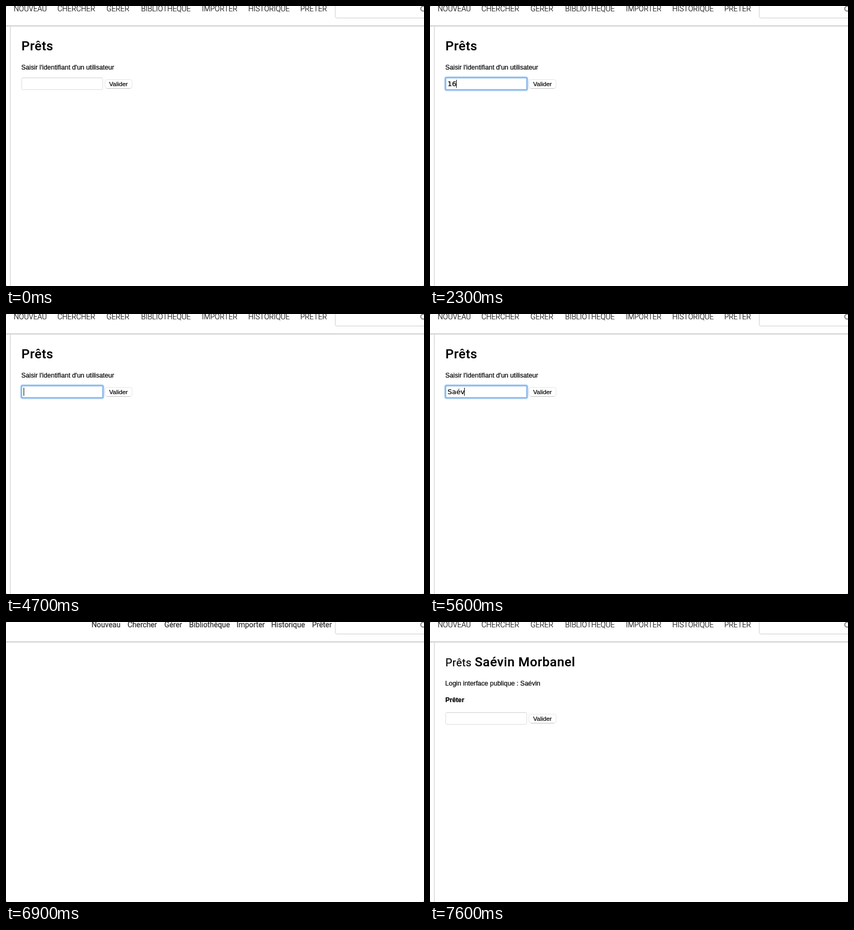
Write an HTML page with a canvas that moves like this. It is 784 by 524 pixels and loops after 8000 ms.

```html
<!DOCTYPE html>
<html lang="fr">
<head>
<meta charset="utf-8">
<title>Prêts</title>
<style>
html, body { margin: 0; width: 100%; height: 100%; overflow: hidden; background: #fff; }
canvas { display: block; }
</style>
</head>
<body>
<canvas id="stage" width="784" height="524"></canvas>
<script>
const ctx = document.getElementById('stage').getContext('2d');
const LOOP = 8000, FOCUS = 1400, LOAD = 6900, RESULT = 7000;
const DIN = 'Roboto, sans-serif';
const SANS = '"Liberation Sans", Arial, sans-serif';
const FIELD = '13px "DejaVu Sans", sans-serif';
const BODY = '12.3px ' + SANS;
const FIRST = 'Saévin', LAST = 'Morbanel';
const ITEMS = ['Nouveau', 'Chercher', 'Gérer', 'Bibliothèque', 'Importer', 'Historique', 'Prêter'];
const WIDE_X = [14.5, 96.5, 188.5, 253.5, 367.5, 454.5, 552];
const NARROW_X = [160.5, 228, 297, 343.5, 432.5, 497.5, 574];

// Each key press: time and resulting field content
const KEYS = [
  [FOCUS, ''], [2000, '1'], [2300, '16'], [2500, '16.'], [2700, '16.1'],
  [4300, '16.'], [4400, '16'], [4600, '1'], [4700, ''],
  ...[5000, 5200, 5400, 5600, 5800, 5900].map((t, i) => [t, FIRST.slice(0, i + 1)]),
  [6000, FIRST + ' '], [6400, FIRST]
];

// A hairline outline gives the text a slightly fuller weight
function text(str, x, y, font, color = '#000', spacing = 0) {
  ctx.font = font;
  ctx.letterSpacing = spacing + 'px';
  ctx.fillStyle = ctx.strokeStyle = color;
  ctx.lineWidth = .22;
  ctx.fillText(str, x, y);
  ctx.strokeText(str, x, y);
}

function rect(x, y, w, h, color) {
  ctx.fillStyle = color;
  ctx.fillRect(x, y, w, h);
}

function box(x, y, w, h, r, stroke, width = 1) {
  ctx.beginPath();
  ctx.roundRect(x, y, w, h, r);
  ctx.strokeStyle = stroke;
  ctx.lineWidth = width;
  ctx.stroke();
}

function header(loading) {
  ITEMS.forEach((item, i) => loading
    ? text(item, NARROW_X[i], 10, '400 13.8px ' + DIN, '#2c2c2c')
    : text(item.toUpperCase(), WIDE_X[i], 10, '300 13.8px ' + DIN, '#111'));
  box(617.5, -20, 200, 42.5, 3, '#ccc');
  ctx.beginPath();
  ctx.arc(782.5, 5, 4.5, 0, Math.PI * 2);
  ctx.strokeStyle = '#858585';
  ctx.lineWidth = 2;
  ctx.stroke();
  rect(0, 36, 784, 1, '#dcdcdc');
  rect(0, 37, 784, 1, '#cdcdcd');
  rect(0, 38, 784, 1, '#f0f0f0');
  if (!loading) {
    rect(7, 38, 1, 486, '#e8e8e8');
    rect(8, 38, 1, 486, '#dadada');
  }
  for (const [x, y] of [[0, 0], [0, 523], [783, 523]]) rect(x, y, 1, 1, '#777');
}

function form(y, focused) {
  box(29.5, y + .5, 152, 22, 2, '#dcdcdc');
  rect(31, y, 149, 1, '#d0d0d0');
  if (focused) {
    box(28.5, y - .5, 154, 24, 3, 'rgba(110,170,235,.3)', 4.5);
    box(29, y, 153, 23, 2, 'rgba(115,174,237,.75)', 2.6);
  }
  box(185.5, y + 3.5, 51, 16.5, 4, '#e4e4e4');
  rect(189, y + 20, 44, 1, '#cbcbcb');
  text('Valider', 193.5, y + 16, '11.5px ' + SANS);
}

function search(t) {
  text('Prêts', 29, 83, '500 24px ' + DIN, '#000', .6);
  text("Saisir l'identifiant d'un utilisateur", 28.7, 119, BODY);
  form(134, t >= FOCUS);
  if (t < FOCUS) return;
  const [since, value] = KEYS.filter(k => k[0] <= t).pop();
  text(value, 33, 150, FIELD);
  const caretOn = Math.floor((t - since) / 500) % 2 === 0;
  if (caretOn) rect(Math.floor(33 + ctx.measureText(value).width), 138, 1, 15, '#000');
}

function result() {
  text('Prêts', 29, 83, '400 20px ' + DIN, '#000', .5);
  text(FIRST + ' ' + LAST, 84, 83, '500 24px ' + DIN, '#000', .6);
  text('Login interface publique : ' + FIRST, 28.5, 119, BODY);
  text('Prêter', 28.7, 150, 'bold ' + BODY);
  form(169, false);
}

function draw() {
  const t = performance.now() % LOOP;
  rect(0, 0, 784, 524, '#fff');
  header(t >= LOAD && t < RESULT);
  if (t < LOAD) search(t);
  else if (t >= RESULT) result();
  requestAnimationFrame(draw);
}
draw();
</script>
</body>
</html>
```
